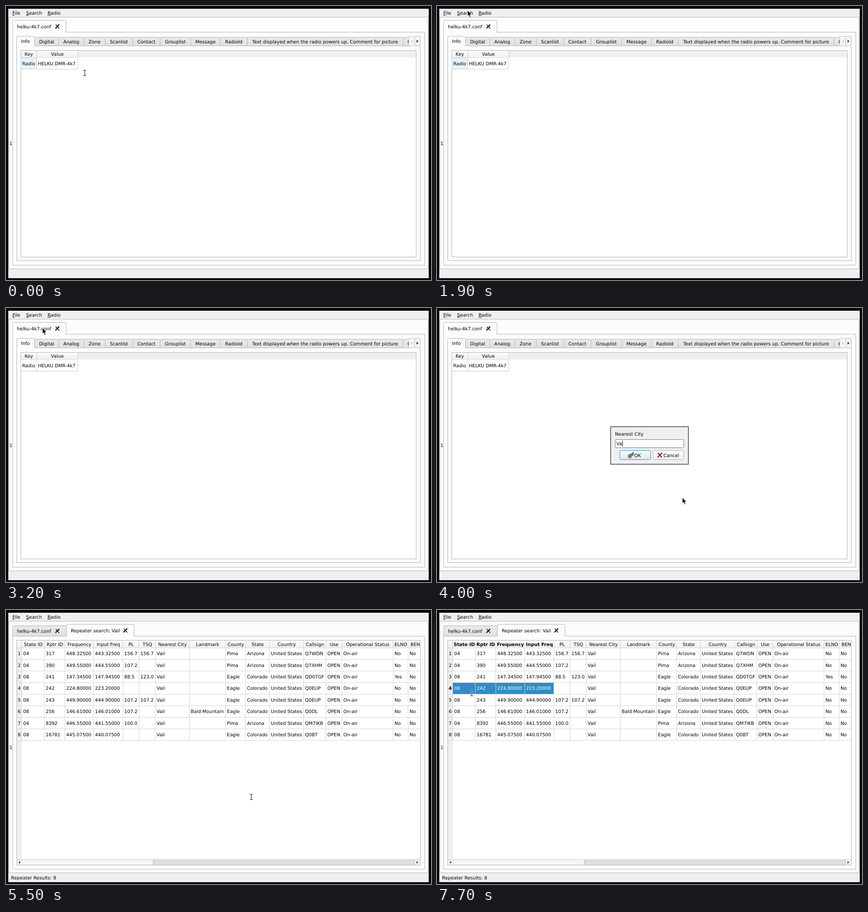
Write an HTML page that moves like this. It is 931 px wide and 601 px high and loops after 8 s.

```html
<!DOCTYPE html>
<html lang="en">
<head>
<meta charset="utf-8">
<title>Repeater search</title>
<style>
html, body { margin: 0; width: 100%; height: 100%; overflow: hidden; background: #050505; }
svg { display: block; width: 100vw; height: 100vh; }
text { font: 10.15px "DejaVu Sans", sans-serif; text-rendering: geometricPrecision; white-space: pre; }
.mid { text-anchor: middle; }
.bold { font-weight: bold; }
.lit { fill: #fff; }
.key { text-decoration: underline; }
.crisp { shape-rendering: crispEdges; }
.timed { opacity: 0; animation: 8s step-end infinite; }
#pointer { animation: roam 8s step-end infinite; }
@keyframes roam {
  0% { transform: translate(172.5px, 147px); }
  5% { transform: translate(172.5px, 147px); animation-timing-function: steps(2); }
  7.5% { transform: translate(208px, 130px); animation-timing-function: steps(2); }
  10% { transform: translate(190px, 85px); animation-timing-function: steps(4); }
  15% { transform: translate(99px, 18px); }
  16.25% { transform: translate(99px, 18px); animation-timing-function: steps(2); }
  18.75% { transform: translate(87px, 10px); }
  23.75% { transform: translate(67px, 9.5px); }
  28.75% { transform: translate(67px, 9.5px); animation-timing-function: steps(2); }
  31.25% { transform: translate(78px, 44px); }
  36.25% { transform: translate(80px, 44px); }
  41.25% { transform: translate(537.5px, 416px); }
  60% { transform: translate(537.5px, 410px); }
  71.25% { transform: translate(583px, 330px); }
  72.5% { transform: translate(567px, 242px); }
  75% { transform: translate(306px, 165px); }
  76.25% { transform: translate(306px, 165px); animation-timing-function: steps(2); }
  78.75% { transform: translate(247px, 162px); }
  81.25% { transform: translate(176px, 113px); }
  82.5% { transform: translate(176px, 113px); animation-timing-function: steps(2); }
  85% { transform: translate(199px, 122px); }
  87.5% { transform: translate(215px, 167px); }
  90% { transform: translate(224.5px, 174px); }
  93.75% { transform: translate(189px, 184px); }
  96.25%, 100% { transform: translate(76px, 182.4px); }
}
</style>
</head>
<body>
<svg id="stage" viewBox="0 0 931 601" preserveAspectRatio="none"></svg>
<script>
const LOOP = 8000, LINE = '#b4b4b4', GRID = '#cbcbcb', WINDOW = '#efefef', PANE = '#fcfcfc', BLUE = '#308cc6';
const rules = new Map();

const soft = (x, y, x2, y2, fill, cls = '') =>
  `<rect class="${cls}" x="${x}" y="${y}" width="${x2 - x}" height="${y2 - y}" fill="${fill}"/>`;
const rect = (x, y, x2, y2, fill) => soft(x, y, x2, y2, fill, 'crisp');
const box = (x, y, x2, y2, fill, stroke = LINE, r = 0) =>
  `<rect x="${x + .5}" y="${y + .5}" width="${x2 - x - 1}" height="${y2 - y - 1}" rx="${r}" fill="${fill}" stroke="${stroke}"/>`;
const path = (d, attrs) => `<path d="${d}" ${attrs}/>`;
const text = (x, mid, s, cls = '') => `<text x="${x}" y="${mid + 3.7}" class="${cls}">${s}</text>`;
const key = c => `<tspan class="key">${c}</tspan>`;

// Shows the markup only between two times of the loop.
function span(from, to, markup) {
  const name = `w${from}-${to}`;
  rules.set(name, `@keyframes ${name}{0%{opacity:0}${from * 100 / LOOP}%{opacity:1}${to * 100 / LOOP}%{opacity:${to < LOOP ? 0 : 1}}}`);
  return `<g class="timed" style="animation-name:${name}">${markup}</g>`;
}

const tab = (x, y, x2, y2, fill) =>
  path(`M${x + .5} ${y2}V${y + 2.5}q0-2 2-2H${x2 - 1.5}q2 0 2 2V${y2}`, `fill="${fill}" stroke="${LINE}"`);
const closeMark = (x, y) =>
  path(`M${x - 3.4} ${y - 4}L${x + 4} ${y + 4.2}`, 'stroke="#111" stroke-width="1.7"') +
  path(`M${x + 4} ${y - 4.3}L${x - 4.3} ${y + 4}`, 'stroke="#111" stroke-width="2.4"');
const headCell = (x, y, x2, y2) => rect(x, y, x2, y2, 'url(#head)') + rect(x2, y, x2 + 1, y2, GRID);

function frame() {
  let s = rect(0, 0, 931, 601, '#050505') + rect(5, 6, 926, 597, WINDOW) + box(6, 24, 925, 577, PANE) +
    text(14, 15, key('F') + 'ile') + text(44, 15, key('S') + 'earch') + text(91, 15, key('R') + 'adio') +
    text(7.5, 301, '1') + box(14, 57, 918, 569, PANE);
  for (let i = 0; i < 3; i++)
    for (let j = 0; j <= i; j++) s += rect(922 - 3 * j, 587 + 3 * i, 923 - 3 * j, 588 + 3 * i, '#d2d2d2');
  return s;
}

function infoView() {
  const tabs = [['Digital', 63], ['Analog', 116], ['Zone', 171], ['Scanlist', 218], ['Contact', 278],
    ['Grouplist', 338], ['Message', 405], ['RadioId', 470],
    ['Text displayed when the radio powers up. Comment for picture', 529], ['', 870]];
  let s = tab(14, 31, 131, 58, PANE) + text(24, 45, 'helku-4k7.conf') + closeMark(112.5, 45) +
    box(23, 87, 908, 559, PANE);
  tabs.forEach(([name, x], i) => {
    const end = i < 9 ? tabs[i + 1][1] : 890;
    s += tab(x - 1, 68, end - 1, 87, 'url(#idle)') + text((x + end) / 2 - .5, 78, name, 'mid');
  });
  s += text(879.5, 78, 'C') + tab(23, 66, 62, 88, PANE) + text(42.5, 77.5, 'Info', 'mid') +
    rect(883, 66, 908, 88, PANE) + box(882, 66, 896, 88, '#f6f6f6', '#c4c4c4', 1) + box(895, 66, 908, 88, '#f6f6f6', LINE, 1) +
    path('M890.5 74.5v6l-3.5-3z', 'fill="#c4c4c4"') + path('M899.5 74v6.6l3.8-3.3z', 'fill="#222"') +
    box(32, 97, 899, 551, '#fff') + rect(33, 98, 898, 113, WINDOW) +
    headCell(33, 98, 67, 113) + headCell(68, 98, 157, 113) + rect(33, 113, 157, 114, '#dcdcdc') +
    text(50, 105.5, 'Key', 'mid') + text(112.5, 105.5, 'Value', 'mid') +
    span(0, 3200, box(32, 113, 68, 139, '#e7f2f9', '#b9cddb')) +
    rect(67, 114, 68, 138, GRID) + rect(157, 114, 158, 138, GRID) + rect(33, 138, 158, 139, GRID) +
    text(35.5, 126, 'Radio') + text(70, 126, 'HELKU DMR-4k7');
  return s;
}

const edges = [34.5, 84, 129, 192, 256, 291.5, 327, 401.5, 481, 525, 577, 652, 701, 736, 848, 881, 907];
const titles = 'State ID|Rptr ID|Frequency|Input Freq|PL|TSQ|Nearest City|Landmark|County|State|Country|Callsign|Use|Operational Status|ELNO'.split('|');
const pima = 'Pima|Arizona', eagle = 'Eagle|Colorado';
const rows = [
  ['04|317|448.32500|443.32500|156.7|156.7', '', pima, 'Q7WDN'],
  ['04|390|449.55000|444.55000|107.2|', '', pima, 'Q7XHM'],
  ['08|241|147.34500|147.94500|88.5|123.0', '', eagle, 'QD0TGF', 'Yes'],
  ['08|242|224.80000|223.20000||', '', eagle, 'Q0EUP'],
  ['08|243|449.90000|444.90000|107.2|107.2', '', eagle, 'Q0EUP'],
  ['08|256|146.61000|146.01000|107.2|', 'Bald Mountain', eagle, 'Q0DL'],
  ['04|8392|446.55000|441.55000|100.0|', '', pima, 'QM7IKB'],
  ['08|16781|445.07500|440.07500||', '', eagle, 'Q0BT']
].map(([nums, mark, place, call, net = 'No']) =>
  `${nums}|Vail|${mark}|${place}|United States|${call}|OPEN|On-air|${net}|No`.split('|'));
// The table is drawn at a reduced scale, so its hairlines are thinner than a pixel.
const HAIR = .85;
const rowTop = i => 82.7 + 25.375 * i;
const rowMid = i => 95.6 + 25.375 * i;
const colLine = c => edges[c] - .5;
const center = c => (edges[c] + edges[c + 1]) / 2 + .4;

function selected(c, from) {
  const x = colLine(c) + HAIR, x2 = colLine(c + 1);
  return span(from, LOOP, soft(x, rowTop(3) + HAIR, x2, rowTop(4), BLUE) +
    text(edges[c] + 3, rowMid(3), rows[3][c], 'lit') +
    soft(x, 67, x2, rowTop(0), 'url(#head)') + text(center(c), 75, titles[c], 'mid bold'));
}

function resultsView() {
  let s = tab(14, 34, 132, 57, 'url(#idle)') + text(24, 46, 'helku-4k7.conf') + closeMark(112.5, 46) +
    tab(132, 31, 280, 58, PANE) + text(142, 45, 'Repeater search: Vail') + closeMark(261.5, 45) +
    box(23, 66, 908, 560, '#fff') + rect(24, 67, 35, 548, WINDOW) + rect(24, 67, 907, 83, 'url(#head)');
  for (let c = 0; c < titles.length + 1; c++)
    s += soft(colLine(c), 67, colLine(c) + HAIR, rowTop(8) + HAIR, GRID);
  for (let i = 0; i <= 8; i++) s += soft(24, rowTop(i), 907, rowTop(i) + HAIR, GRID);
  titles.forEach((name, c) => s += text(center(c), 75, name, 'mid'));
  s += text(886, 75, 'BEN');
  rows.forEach((row, r) => {
    s += text(29, rowMid(r), r + 1, 'mid');
    row.forEach((v, c) => { if (v) s += text(edges[c] + 3, rowMid(r), v); });
  });
  s += selected(3, 7400) + selected(2, 7500) + selected(1, 7700) + selected(0, 7700) +
    span(7400, LOOP, soft(24, rowTop(3) + HAIR, colLine(0), rowTop(4), WINDOW) + text(29, rowMid(3), '4', 'mid bold')) +
    rect(24, 547, 907, 559, '#dedede') + rect(24, 547, 907, 548, '#c8c8c8') +
    rect(24, 548, 322, 559, '#f6f6f6') + rect(35, 548, 36, 559, '#d0d0d0') + rect(322, 548, 323, 559, LINE) +
    rect(895, 548, 907, 559, '#f6f6f6') + rect(895, 548, 896, 559, '#c8c8c8') +
    path('M31 550.5v6l-3.6-3z', 'fill="#333"') + path('M899.3 550.5v6l3.6-3z', 'fill="#333"') +
    text(11, 587, 'Repeater Results: 8');
  return s;
}

function menu() {
  const item = (mid, label, keys, cls) => text(64, mid, label, cls) + text(216, mid, keys, cls);
  const first = cls => item(33.5, 'S' + key('e') + 'arch Callsign', 'Ctrl+E', cls);
  const second = cls => item(53, 'Search Beaconledger', 'Ctrl+R', cls);
  return rect(41, 7, 83, 24, BLUE) + text(44, 15, key('S') + 'earch', 'lit') +
    path('M42 64H264V26', 'fill="none" stroke="#000" stroke-opacity=".12" stroke-width="3"') +
    box(40, 23, 263, 63, '#fff', '#7d8a92') + first() + second() +
    span(2400, 2500, rect(41, 24, 262, 43, BLUE) + first('lit')) +
    span(2500, 3200, rect(41, 43, 262, 62, BLUE) + second('lit'));
}

function dialog() {
  const stops = [[3300, 393.5], [3600, 400], [4000, 405.5], [4300, 408.5], [4500, 411], [4800]];
  let s = box(379, 259, 552, 344, '#ddd', '#ccc') + box(380, 260, 551, 343, WINDOW, '#1c1c1c') +
    text(390, 276.5, 'Nearest City') + box(390, 288, 541, 307, '#fff', BLUE, 2) +
    box(400, 312, 468, 333, 'url(#okay)', '#4a87ad', 2) + box(473, 312, 541, 333, 'url(#head)', LINE, 2) +
    path('M418.5 324l4-4.5 1.5 1.8 5-4.3 2 .2-.5 5-5.5 4 .8 2-6 .5z', 'fill="#74806a" stroke="#4c5645" stroke-width=".8"') +
    path('M484 318l8.5 9.5M493 317.5L483.5 327.5', 'fill="none" stroke="#8c2c35" stroke-width="2.6"') +
    text(432, 323, 'OK') + text(496, 323, 'Cancel');
  stops.slice(0, -1).forEach(([at, x], n) => {
    s += span(at, stops[n + 1][0], text(393, 297.5, 'Vail'.slice(0, n)) + rect(x, 291, x + 1, 304, '#000'));
  });
  return s;
}

const beamPath = 'M-3.2-5.7H-1L0-5 1-5.7H3.2M0-5V5M-3.2 5.7H-1L0 5 1 5.7H3.2';
const beam = path(beamPath, 'fill="none" stroke="#fff" stroke-width="2.6"') +
  path(beamPath, 'fill="none" stroke="#111" stroke-width="1.1"');
const arrow = path('M0 0V12.6L2.9 10 5 15.2 7.2 14.3 5.1 9.3 8.8 9Z', 'fill="#000" stroke="#fff" stroke-width=".8"');

const shade = (id, top, bottom) => `<linearGradient id="${id}" x2="0" y2="1"><stop stop-color="${top}"/><stop offset="1" stop-color="${bottom}"/></linearGradient>`;
const scene = `<defs>${shade('head', '#fbfbfb', '#f0f0f0')}${shade('idle', '#e9e9e9', '#e1e1e1')}${shade('okay', '#f8fbfd', '#dce7ee')}</defs>` +
  frame() + span(0, 5500, infoView()) + span(5500, LOOP, resultsView()) +
  span(4800, 5500, text(11, 587, 'Searching...')) +
  span(2100, 3200, menu()) + span(3300, 4800, dialog()) +
  `<g id="pointer">${span(0, 700, beam)}${span(700, 4800, arrow)}${span(4800, LOOP, beam)}</g>`;

const sheet = document.createElement('style');
sheet.textContent = [...rules.values()].join('\n');
document.head.append(sheet);
document.getElementById('stage').innerHTML = scene;
</script>
</body>
</html>
```
